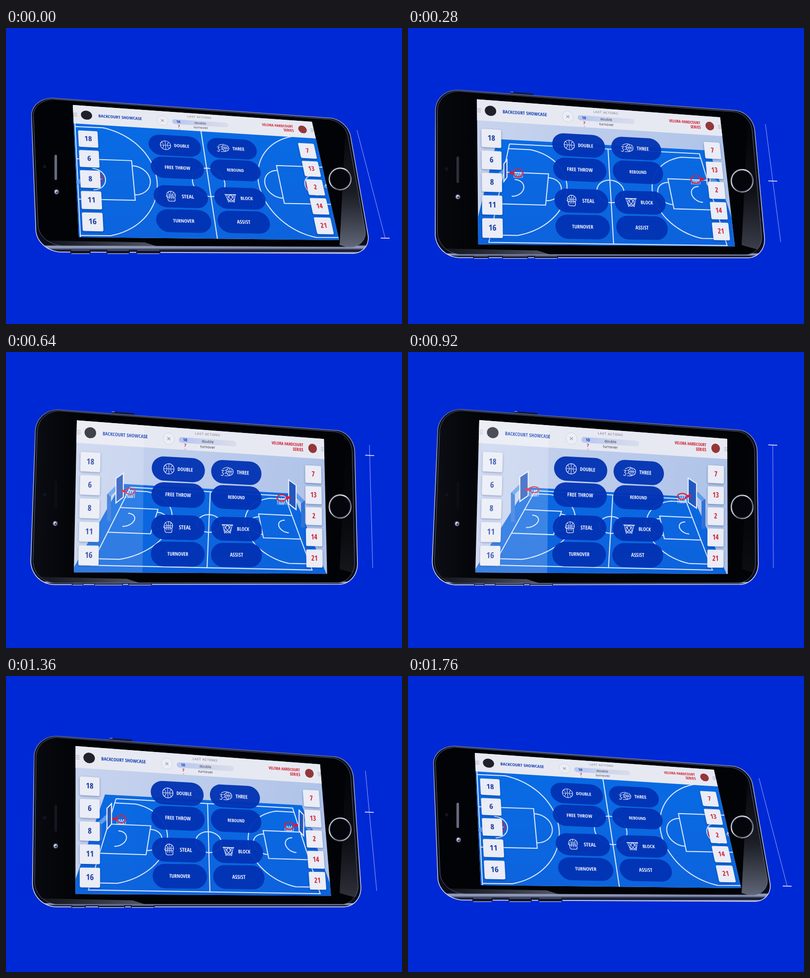
Recreate the animation shown at these times as an HTML page with a canvas. Size 800 px wide and 600 px high, loop 1800 ms.

```html
<!DOCTYPE html>
<html lang="en">
<head>
<meta charset="utf-8">
<title>Basketball stats phone</title>
<style>
html, body { margin: 0; width: 100%; height: 100%; overflow: hidden; background: #0029d6; }
canvas { display: block; width: 800px; height: 600px; }
</style>
</head>
<body>
<canvas id="stage" width="800" height="600"></canvas>
<script>
const ctx = document.getElementById('stage').getContext('2d');
const LOOP = 1800, SWING = 1760, STEP = 40;
const NARROW = '"Open Sans Condensed", "Open Sans", "Noto Sans", Roboto, sans-serif';
const PLAIN = 'Inter, Roboto, sans-serif';
const INK = '#e6ecff';

// Quads run clockwise from the top left: leaning back, then upright
const BODY = [[50, 139, 690, 185, 738, 457, 62, 454], [62, 113, 705, 161, 708, 471, 47, 472]];
const SCREEN = [[135, 156, 618, 190, 673, 430, 147, 424], [144, 138, 645, 176, 646, 450, 136, 447]];
const PANEL = [[166, 225, 609, 249, 642, 401, 175, 393], [171, 223, 622, 248, 621, 419, 166, 413]];
const COURT = [[139, 186, 625, 209, 682, 440, 151, 437], [257, 281, 560, 298, 615, 442, 173, 432]];
const GAUGE = [[709, 207, 766, 426], [737, 188, 738, 438]];

let mark = 0, tilt = 0;

// Quick rise, sine fall; the tilt trails the gauge mark a little
function setTime(t) {
  const u = Math.min(1, t / SWING);
  mark = u < .5 ? 1 - (1 - 2 * u) ** 1.9 : Math.sin(Math.PI * u);
  tilt = mark - .2 * mark * (1 - mark);
}

const ease = k => 1 - (1 - tilt) ** k;
const lerp = (a, b, k = 1) => a + (b - a) * ease(k);
const rise = (a, b) => lerp(a, b, 1.6);
const pose = ([a, b], kx = 1, ky = 1.6) => a.map((v, i) => lerp(v, b[i], i % 2 ? ky : kx));

// Perspective map from a w by h rectangle to a quad
function plane([x0, y0, x1, y1, x2, y2, x3, y3], w, h) {
  const ax = x1 - x2, bx = x3 - x2, sx = x0 - x1 + x2 - x3;
  const ay = y1 - y2, by = y3 - y2, sy = y0 - y1 + y2 - y3;
  const den = ax * by - bx * ay, g = (sx * by - bx * sy) / den, k = (ax * sy - sx * ay) / den;
  return (x, y) => {
    const u = x / w, v = y / h, q = 1 + g * u + k * v;
    return [((x1 - x0 + g * x1) * u + (x3 - x0 + k * x3) * v + x0) / q,
            ((y1 - y0 + g * y1) * u + (y3 - y0 + k * y3) * v + y0) / q];
  };
}

function trace(pts, close) {
  ctx.beginPath();
  pts.forEach(p => ctx.lineTo(p[0], p[1]));
  if (close) ctx.closePath();
}
function stroke(color, width) {
  ctx.strokeStyle = color;
  ctx.lineWidth = width;
  ctx.stroke();
}
function fill(color) {
  ctx.fillStyle = color;
  ctx.fill();
}
const shape = (pts, color) => { trace(pts, true); fill(color); };
const line = (pts, color, width) => { trace(pts); stroke(color, width); };
const rect = (P, x, y, w, h) => [P(x, y), P(x + w, y), P(x + w, y + h), P(x, y + h)];

function arc(cx, cy, r, a, b) {
  return Array.from({ length: 41 }, (_, i) => {
    const t = a + (b - a) * i / 40;
    return [cx + r * Math.cos(t), cy + r * Math.sin(t)];
  });
}

function rounded(P, w, h, r) {
  const q = Math.PI / 2;
  return [[w - r, r, -q], [w - r, h - r, 0], [r, h - r, q], [r, r, 2 * q]]
    .flatMap(([x, y, a]) => arc(x, y, r, a, a + q)).map(p => P(...p));
}

// Draw in the local frame of a point on a plane
function on(P, x, y, draw) {
  const [x0, y0] = P(x, y), [ax, ay] = P(x + 1, y), [bx, by] = P(x, y + 1);
  ctx.save();
  ctx.transform(ax - x0, ay - y0, bx - x0, by - y0, x0, y0);
  draw();
  ctx.restore();
}

function text(s, x, y, font, color, align = 'center') {
  ctx.font = font;
  ctx.fillStyle = color;
  ctx.textAlign = align;
  ctx.textBaseline = 'middle';
  ctx.fillText(s, x, y);
}

// Bold narrow lettering; sets smaller when the face at hand runs wide
function label(s, x, y, size, color, align) {
  const face = n => `700 extra-condensed ${n}px ${NARROW}`;
  ctx.font = face(size);
  const fit = Math.min(1, s.length * size * .47 / ctx.measureText(s).width);
  text(s, x, y, face(size * fit), color, align);
}

function pill(x, y, w, h, r, color) {
  ctx.beginPath();
  ctx.roundRect(x, y, w, h, r);
  fill(color);
}
function oval(x, y, rx, ry) {
  ctx.beginPath();
  ctx.ellipse(x, y, rx, ry, 0, 0, 7);
}
const disc = (x, y, rx, ry, color) => { oval(x, y, rx, ry); fill(color); };
const ring = (x, y, rx, ry, color, width) => { oval(x, y, rx, ry); stroke(color, width); };

// Linear gradient with evenly spaced colours
function fade(x0, y0, x1, y1, ...colors) {
  const g = ctx.createLinearGradient(x0, y0, x1, y1);
  colors.forEach((c, i) => g.addColorStop(i / (colors.length - 1), c));
  return g;
}

function ball(x, y, r) {
  ctx.save();
  ring(x, y, r, r, INK, 1.2);
  ctx.clip();
  line([[x - r, y], [x + r, y]], INK, 1);
  line([[x, y - r], [x, y + r]], INK, 1);
  for (const s of [-1.25, 1.25]) ring(x + s * r, y, r * .9, r * .9, INK, 1);
  ctx.restore();
}

const ICONS = {
  DOUBLE() { ball(0, 0, 10.5); },
  THREE() {
    ball(5, -1, 7.5);
    line([[-13, -3], [-8, -3], [-11, 1], [-8, 4], [-10, 8], [-14, 7]], INK, 1.2);
    line([[-10, -6], [-4, -9], [3, -10]], INK, 1.1);
    line([[-6, 8], [0, 8], [5, 7.5]], INK, 1.1);
    for (const y of [-3, 3]) line([[-6, y], [-2, y - 1]], INK, 1.1);
  },
  STEAL() {
    ball(0, -3, 8.5);
    pill(-7, 1, 14, 9.5, 3, '#0637b5');
    stroke(INK, 1.2);
    for (let x = -3.5; x < 5; x += 3.5) line([[x, 1], [x, 6]], INK, 1.1);
    line([[-7, 3], [-10, -1]], INK, 1.2);
  },
  BLOCK() {
    line([[-12, -8], [12, -8]], INK, 1.8);
    for (const s of [-1, 1]) {
      line([[-10 * s, -8], [-6 * s, 9], [s, 2], [8 * s, -8]], INK, 1.1);
      line([[-8 * s, -1], [0, -8], [7 * s, 3], [2 * s, 9], [-7 * s, 2]], INK, 1);
    }
  }
};

function drawBody() {
  const q = pose(BODY), depth = rise(13, 3), base = (q[5] + q[7]) / 2, glass = base - depth;

  const kx = lerp(200, 215), ky = q[1] + (q[3] - q[1]) * (kx - q[0]) / (q[2] - q[0]);
  ctx.globalAlpha = Math.min(1, tilt * 2);
  line([[kx, ky - 2.5], [kx + 46, ky + 1]], '#141a38', 4);
  line([[kx, ky - 4], [kx + 6, ky - 3.6]], '#cfd5ee', 1);
  ctx.globalAlpha = 1;

  shape(rounded(plane(q, 138, 67), 138, 67, 9), fade(0, glass - 3, 0, base + 1,
    '#0a0d1b', '#a4acca', '#7d86a6', '#20263f', '#12172c', '#dfe4f6'));
  stroke(fade(0, 110, 0, 470, '#59617f', '#a9b1cd', '#b5bdd8', '#e3e8f8'), 1.5);

  const inset = [4, 2.5, -5, 2.5, -6, -depth, 4.5, -depth];
  const face = rounded(plane(q.map((v, i) => v + inset[i]), 138, 67), 138, 67, 8.8);
  shape(face, '#020306');
  stroke('#596080', 1);

  // Reflections on the glass
  ctx.save();
  ctx.clip();
  ctx.globalAlpha = tilt;
  ctx.fillStyle = fade(52, 0, 145, 0, 'rgba(52,58,78,.22)', 'rgba(30,34,48,.06)');
  ctx.fillRect(40, 100, 106, 380);
  ctx.globalAlpha = 1 - .9 * tilt;
  shape([[686, 200], [745, 190], [745, 460], [674, 440]],
    fade(0, 220, 0, 445, 'rgba(120,128,152,.05)', 'rgba(120,128,152,.2)', 'rgba(150,158,182,.65)'));
  ctx.globalAlpha = 1;
  const end = lerp(305, 265);
  shape([[70, glass - 12], [end - 25, glass - 8], [end, glass], [75, glass]],
    fade(70, 0, end, 0, 'rgba(130,138,165,.1)', 'rgba(150,158,185,.55)'));
  ctx.restore();

  // Side keys: start and length, leaning back and upright
  const y = rise(454, 471), h = rise(7, 3.4);
  for (const [x0, w0, x1, w1] of [[130, 41, 133, 22], [203, 47, 175, 60], [263, 49, 245, 48]]) {
    const x = lerp(x0, x1), w = lerp(w0, w1);
    pill(x, y - h / 2, w, h, 3, '#12172f');
    line([[x + 2, y - h / 2], [x + w - 2, y - h / 2]], '#7d86ab', 1);
    line([[x + 2, y + h / 2], [x + w - 2, y + h / 2]], '#d5dbf0', 1.2);
  }
}

function drawFace() {
  const ey = rise(257, 262), eh = rise(51, 56);
  pill(97.5, ey, 6, eh, 3, '#0c0e16');
  ctx.globalAlpha = Math.max(0, 1 - tilt * 1.5);
  pill(98, ey, 5, eh, 2.5, '#777c90');
  for (let y = ey + 3; y < ey + eh - 2; y += 3) line([[98.5, y], [102.5, y]], '#3c4152', 1);
  ctx.globalAlpha = 1;

  const cx = lerp(102, 99), cy = rise(332, 348);
  disc(cx, cy, 6, 6, '#1a1e2c');
  disc(cx, cy, 4.2, 4.5, '#9ba6c4');
  disc(cx + 1, cy + 1, 2, 2, '#303b62');
  disc(cx - 1, cy - 1.5, 1.4, 1.4, '#f2f6ff');
  disc(78, rise(281, 289), 3.5, 3.8, '#11131f');

  const hy = lerp(306, 314), hr = lerp(22, 23.6);
  disc(675, hy, 22, hr, '#05060b');
  ring(675, hy, 22, hr, fade(655, hy - 20, 697, hy + 20, '#a5abbd', '#e7eaf3', '#697084', '#d7dbea'), 2.3);
  ring(675, hy, 20, hr - 2, '#343949', .8);
}

// Floor in metres
function drawCourt(P) {
  shape(rect(P, -1.8, -.8, 31.6, 17.2), fade(0, 200, 0, 450, '#086be4', '#0d63dc'));
  const draw = pts => line(pts.map(p => P(...p)), '#dce8ff', 2);
  const end = Math.asin(6.6 / 6.75), half = Math.PI / 2;
  draw([[0, 0], [28, 0], [28, 15], [0, 15], [0, 0]]);
  draw([[14, 0], [14, 15]]);
  draw(arc(14, 7.5, 1.8, 0, Math.PI * 2));
  for (const far of [false, true]) {
    const side = pts => draw(pts.map(([x, y]) => [far ? 28 - x : x, y]));
    side([[0, .9], ...arc(1.575, 7.5, 6.75, -end, end), [0, 14.1]]);
    side([[0, 5.05], [5.8, 5.05], [5.8, 9.95], [0, 9.95]]);
    side(arc(5.8, 7.5, 1.8, -half, half));
    side(arc(1.575, 7.5, 1.3, -half, half));
  }
}

// The hoop stands over its floor spot and grows out of it as the phone turns
function drawHoop(P, dir) {
  const [fx, fy] = P(14 - dir * 12.425, 7.5);
  const x = fx + dir * 10, y = fy - 64 * tilt;
  const at = (dx, dy) => [x + dir * dx, y + dy];
  const size = ease(2), ry = lerp(10, 6), drop = 14 * size;
  line([at(-43, 6 + 60 * tilt), at(-43, 6)], '#2f72d8', 8);
  line([at(-43, 8), at(-28, -7 * size)], '#5f9cec', 8);

  const back = -12 - 20 * (1 - tilt);
  shape([at(back, -37 * size), at(back, 12 * size), at(-29, 24 * size), at(-29, -26 * size)], '#2457bd');
  stroke('#e4ebfa', 2.2);

  for (let k = -2; k <= 2; k++) for (const s of [-1, 1])
    line([at(k * 4.5, 0), at((k + s) * 2.8, drop)], '#e3ebfb', 1);
  line([at(-18, -1), at(-8, 0)], '#d81c35', 5);
  ring(x, y, 9.5, ry, '#e01f38', 2.2);
}

function drawPanel() {
  const P = plane(pose(PANEL), 460, 180), rows = [5, 57, 122, 175];
  const names = [['DOUBLE', 'FREE THROW', 'STEAL', 'TURNOVER'], ['THREE', 'REBOUND', 'BLOCK', 'ASSIST']];
  names.forEach((col, c) => col.forEach((name, r) => on(P, c ? 290 : 170, rows[r], () => {
    pill(-53.5, -24.5, 107, 49, 24.5, 'rgba(3,52,180,.96)');
    const icon = ICONS[name];
    label(name, icon ? 14 : 0, .5, 11, '#f1f4ff');
    if (icon) { ctx.translate(-19, 0); icon(); }
  })));
  [[18, 6, 8, 11, 16], [7, 13, 2, 14, 21]].forEach((col, c) => col.forEach((n, r) => on(P, c * 460, r * 45, () => {
    ctx.shadowColor = 'rgba(0,25,100,.4)';
    ctx.shadowBlur = 4;
    ctx.shadowOffsetY = 1.5;
    pill(-18.5, -19, 37, 38, 3, '#eaecf6');
    ctx.shadowColor = 'transparent';
    label(String(n), 0, .5, 15.5, c ? '#d01f30' : '#1d3c9f');
  })));
}

function drawHeader(P) {
  const at = (x, y, draw) => on(P, x, y, draw);
  shape(rect(P, -2, -2, 671, 59), '#e7e9f2');
  for (const x of [5, 662]) for (const y of [25, 29.5, 34])
    line([P(x - 5, y), P(x + 5, y)], '#a9aebd', 1);
  at(33, 29, () => disc(0, 0, 14, 14, '#20202a'));
  at(632, 29, () => disc(0, 0, 13, 13, '#94363a'));
  at(63, 30, () => label('BACKCOURT SHOWCASE', 0, 0, 13, '#1440b4', 'left'));
  at(604, 22.5, () => label('VELORA HARDCOURT', 0, 0, 12.5, '#cf1f30', 'right'));
  at(604, 36, () => label('SERIES', 0, 0, 12.5, '#cf1f30', 'right'));
  at(230, 30, () => {
    disc(0, 0, 14.5, 15.5, '#eceef5');
    stroke('#cdd1dd', 1.2);
    for (const s of [-4, 4]) line([[-4, s], [4, -s]], '#868b9c', 1.3);
  });
  at(333, 11.5, () => {
    ctx.letterSpacing = '0.5px';
    text('LAST ACTIONS', 0, 0, `400 8.5px ${PLAIN}`, '#6f7485');
  });
  at(333, 31, () => pill(-78, -7.5, 156, 15, 7.5, fade(-78, 0, 78, 0, '#b4c5f0', '#cbd4ee', '#d9ddea')));
  [['18', 'double', '#1d3fae'], ['7', 'turnover', '#d01f30']].forEach(([n, act, color], i) => {
    at(273, 31 + i * 14.5, () => text(n, 0, 0, `700 10.5px ${PLAIN}`, color));
    at(333, 31 + i * 14.5, () => text(act, 0, 0, `400 10px ${PLAIN}`, '#3c4150'));
  });
  line([P(271, 55), P(275, 55)], '#dc7a84', 1);
}

function drawScreen() {
  const P = plane(pose(SCREEN), 667, 375), floor = plane(pose(COURT, 1.3, 1.15), 28, 15);
  ctx.save();
  trace(rect(P, 0, 0, 667, 375), true);
  ctx.clip();
  ctx.fillStyle = fade(140, 180, 645, 300, '#c8d4ee', '#aec3e9');
  ctx.fillRect(100, 100, 600, 400);
  drawCourt(floor);
  drawHoop(floor, 1);
  drawHoop(floor, -1);
  drawPanel();
  drawHeader(P);
  const glare = Math.max(0, tilt - .6) / 2, gx = lerp(230, 285);
  shape([[100, 100], [gx, 100], [gx - 4, 480], [100, 480]], `rgba(255,255,255,${glare})`);
  ctx.restore();
}

function drawGauge() {
  const [x0, y0, x1, y1] = pose(GAUGE);
  const x = x1 + (x0 - x1) * mark, y = y1 + (y0 - y1) * mark;
  line([[x0, y0], [x1, y1]], 'rgba(225,232,255,.65)', 1);
  line([[x - 9, y - .3], [x + 9, y + .3]], '#f4f6ff', 1.5);
}

function frame(now) {
  setTime(Math.floor(now % LOOP / STEP) * STEP);
  ctx.fillStyle = '#0029d6';
  ctx.fillRect(0, 0, 800, 600);
  drawBody();
  drawFace();
  drawScreen();
  drawGauge();
}

const start = performance.now();
(function tick() {
  frame(performance.now() - start);
  requestAnimationFrame(tick);
})();
</script>
</body>
</html>
```
